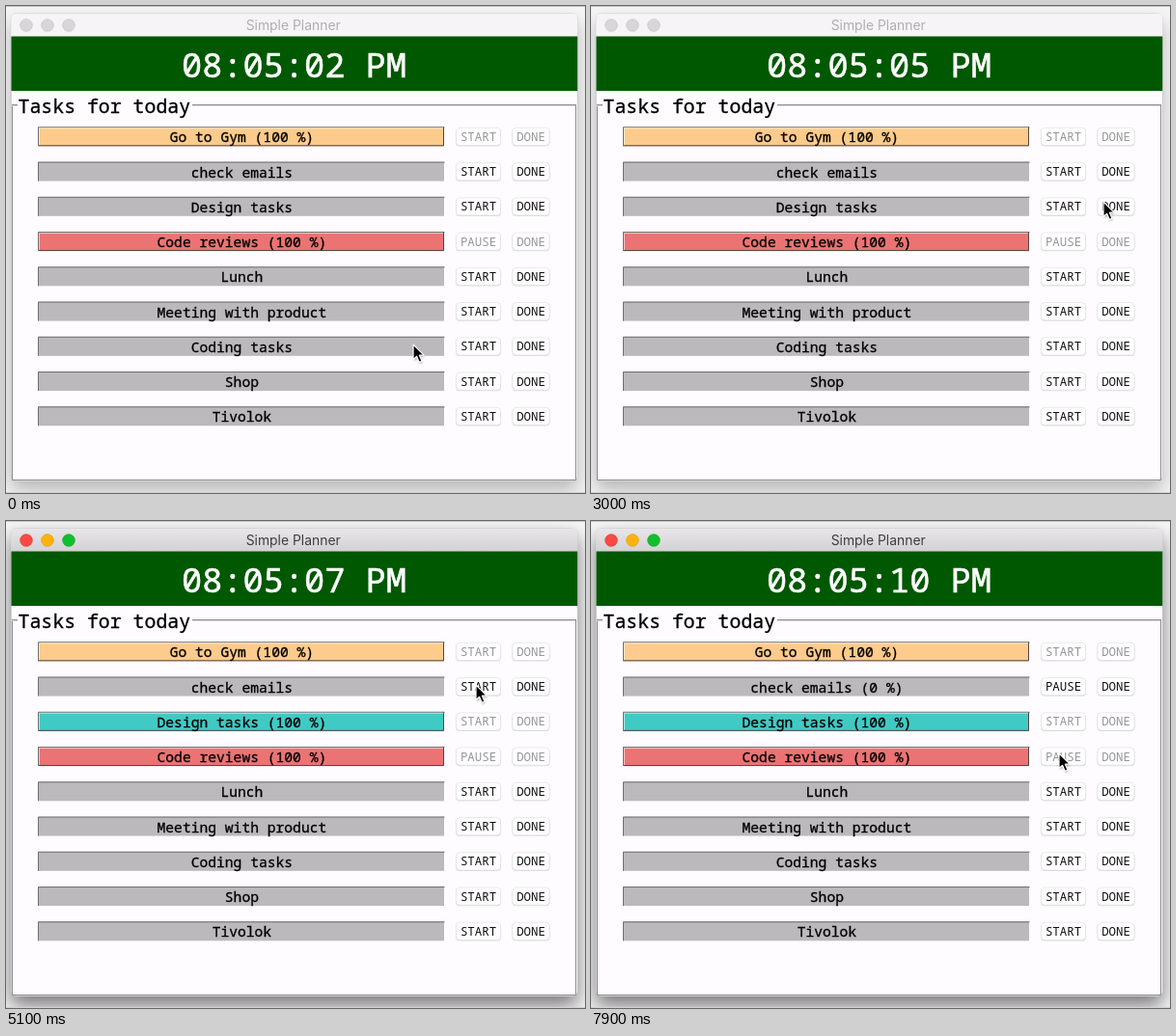
Recreate the animation shown at these times as an HTML page. Size 600 by 505 pixels, loop 8 s.

```html
<!DOCTYPE html>
<html lang="en">
<head>
<meta charset="utf-8">
<title>Simple Planner</title>
<style>
  html, body { margin: 0; width: 100%; height: 100%; overflow: hidden; background: #f6f5f6; }
  svg { display: block; width: 600px; height: 505px; }
  text { font-family: "Noto Sans Mono", "DejaVu Sans Mono", monospace; text-anchor: middle; white-space: pre; }
  .title { font: 13.9px Inter, Roboto, sans-serif; }
  .clock { font-size: 35.3px; stroke: #fff; stroke-width: 0.6; }
  .legend { font-size: 19.85px; text-anchor: start; stroke: #000; stroke-width: 0.3; }
  .task { font-size: 14.65px; stroke: #000; stroke-width: 0.3; }
  .btn { font-size: 12.4px; }
</style>
</head>
<body>
<svg id="stage" viewBox="0 0 600 505" xmlns="http://www.w3.org/2000/svg">
  <defs>
    <linearGradient id="bar" x2="0" y2="1">
      <stop stop-color="#e8e6e8"/><stop offset="1" stop-color="#d2d0d2"/>
    </linearGradient>
    <linearGradient id="press" x2="0" y2="1">
      <stop stop-color="#3f8ef3"/><stop offset="1" stop-color="#0f52dc"/>
    </linearGradient>
    <filter id="blur" x="-10%" y="-10%" width="120%" height="125%"><feGaussianBlur stdDeviation="10"/></filter>
    <filter id="soft" x="-50%" y="-50%" width="200%" height="200%"><feGaussianBlur stdDeviation="1"/></filter>
  </defs>
</svg>
<script>
const LOOP = 8000, STEP = 100;
const stage = document.getElementById('stage');

function add(tag, attrs, text, parent = stage) {
  const el = document.createElementNS('http://www.w3.org/2000/svg', tag);
  set(el, attrs);
  if (text !== undefined) el.textContent = text;
  return parent.appendChild(el);
}
function set(el, attrs) {
  for (const key in attrs) el.setAttribute(key, attrs[key]);
}
const rect = (x, y, width, height, fill, more) => add('rect', { x, y, width, height, fill, ...more });
const label = (cls, x, y, text, fill = '#000') => add('text', { class: cls, x, y, fill }, text);
const line = (d, stroke, parent) => add('path', { d, stroke, fill: 'none' }, undefined, parent);

// Window and its shadow
rect(0, 0, 600, 505, '#f6f5f6');
const shadow = rect(5, 18, 587, 484, '#000', { filter: 'url(#blur)' });
rect(0, 0, 600, 1, '#c9c8c9');
rect(0, 504, 600, 1, '#d2d1d2');
rect(5.3, 8, 587, 484.7, '#fefcff', { rx: 5, stroke: '#b9b7b9', 'stroke-width': 0.6 });
const titleBar = add('path', { d: 'M5.3 32V13q0-5 5-5H587.3q5 0 5 5V32Z' });
const lights = [21, 43, 65].map(cx => add('circle', { cx, cy: 20, r: 6.3 }));
const title = label('title', 297.7, 25, 'Simple Planner');
rect(5.5, 31.5, 586.7, 56.5, '#005800');
const clock = label('clock', 298.5, 73.6, '', '#fff');

// Group box
line('M6 102.5H12M193 102.5H591M6.5 102V491.5H590.5V103', '#8f8d90');
line('M6 103.5H12M193 103.5H590', '#d8d6d9');
label('legend', 12.5, 111, 'Tasks for today');

function makeButton(x, y, width) {
  rect(x, y - 8.3, width, 18.6, '#000', { rx: 4, opacity: 0.13 });
  const box = rect(x + 0.4, y - 9, width - 0.8, 18.2, '#fff', { rx: 3.8, 'stroke-width': 0.6 });
  const text = label('btn', x + width / 2, y + 4.5, '');
  return (caption, enabled, pressed) => {
    text.textContent = caption;
    set(text, { fill: enabled ? '#111' : '#979598' });
    set(box, {
      fill: pressed ? 'url(#press)' : '#fffeff',
      stroke: pressed ? '#1450c4' : '#dcdadd'
    });
  };
}

function makeRow(name, i) {
  const y = 135.3 + i * 36.25, top = y - 9.5, end = top + 19.5;
  rect(33, top - 0.5, 421, 20, '#bbb9bc');
  line(`M33.5 ${end}V${top}H454.5`, '#6f6d70');
  const fill = add('g', {});
  const body = add('rect', { x: 34, y: top + 0.5, width: 420, height: 19 }, undefined, fill);
  line(`M34.5 ${end - 1}V${top + 1}H453`, '#ffffff90', fill);
  line(`M34 ${end - 0.5}H453.5V${top}`, '#55453f', fill);
  const text = label('task', 244.4, y + 6, '');
  const main = makeButton(466, y, 47), done = makeButton(524.5, y, 39);
  return ({ percent, color, caption = 'START', enabled = true, pressed }) => {
    text.textContent = percent === undefined ? name : `${name} (${percent} %)`;
    set(fill, { visibility: color ? 'visible' : 'hidden' });
    if (color) set(body, { fill: color });
    main(caption, enabled, pressed === 'main');
    done('DONE', enabled, pressed === 'done');
  };
}

const rows = ['Go to Gym', 'check emails', 'Design tasks', 'Code reviews', 'Lunch',
  'Meeting with product', 'Coding tasks', 'Shop', 'Tivolok'].map(makeRow);

// Pointer
const arrow = 'M0 0V15.6L3.6 12.3L6.2 18.4L9 17.2L6.4 11.2H11.2Z';
const pointer = add('g', {});
add('path', { d: arrow, transform: 'translate(.6 1.6)', opacity: 0.35, filter: 'url(#soft)' }, undefined, pointer);
add('path', { d: arrow, stroke: '#fff', 'stroke-width': 1.2, 'stroke-linejoin': 'round' }, undefined, pointer);

// Pointer stops: time, x, y
const path = [
  [0, 422, 351], [700, 422, 351], [900, 425, 338], [1400, 474, 251], [1900, 511, 187],
  [2000, 511, 187], [2400, 531, 203], [3000, 531, 203], [3400, 542, 211], [4300, 542, 211],
  [5000, 487, 170], [7000, 487, 170], [7700, 485, 241], [LOOP, 485, 241]
];
function pointerAt(t) {
  const n = path.findIndex(p => p[0] > t);
  const [t0, x0, y0] = path[n - 1], [t1, x1, y1] = path[n];
  const k = (t - t0) / (t1 - t0), e = k * k * (3 - 2 * k);
  return [x0 + (x1 - x0) * e, y0 + (y1 - y0) * e];
}

const finished = color => ({ percent: 100, color, enabled: false });

function draw(t) {
  const active = t >= 3700;
  const within = (from, to) => t >= from && t < to;
  const seconds = 2 + Math.floor((t + 700) / 1000);
  clock.textContent = `08:05:${String(seconds).padStart(2, '0')} PM`;

  set(shadow, { opacity: active ? 0.52 : 0.26 });
  set(titleBar, { fill: active ? 'url(#bar)' : '#f6f4f6' });
  set(title, { fill: active ? '#403e40' : '#b0aeb0' });
  const tints = active ? ['#fc4845', '#fdb20d', '#10bf2c'] : Array(3).fill('#d8d6d8');
  const rims = active ? ['#df3b38', '#dd9c10', '#12a526'] : Array(3).fill('#c6c4c6');
  lights.forEach((dot, i) => set(dot, { fill: tints[i], stroke: rims[i], 'stroke-width': 0.7 }));

  const states = {
    0: finished('#fdcb8b'),
    1: t >= 6600 ? { percent: 0, caption: 'PAUSE' } : { pressed: within(6400, 6600) && 'main' },
    2: t >= 4100 ? finished('#40cac4') : { pressed: within(3800, 4100) && 'done' },
    3: { ...finished('#ec7373'), caption: 'PAUSE' }
  };
  rows.forEach((update, i) => update(states[i] || {}));
  set(pointer, { transform: `translate(${pointerAt(t)})` });
}

const start = performance.now();
function tick() {
  const t = (performance.now() - start) % LOOP;
  draw(Math.floor(t / STEP) * STEP);
  requestAnimationFrame(tick);
}
tick();
</script>
</body>
</html>
```
